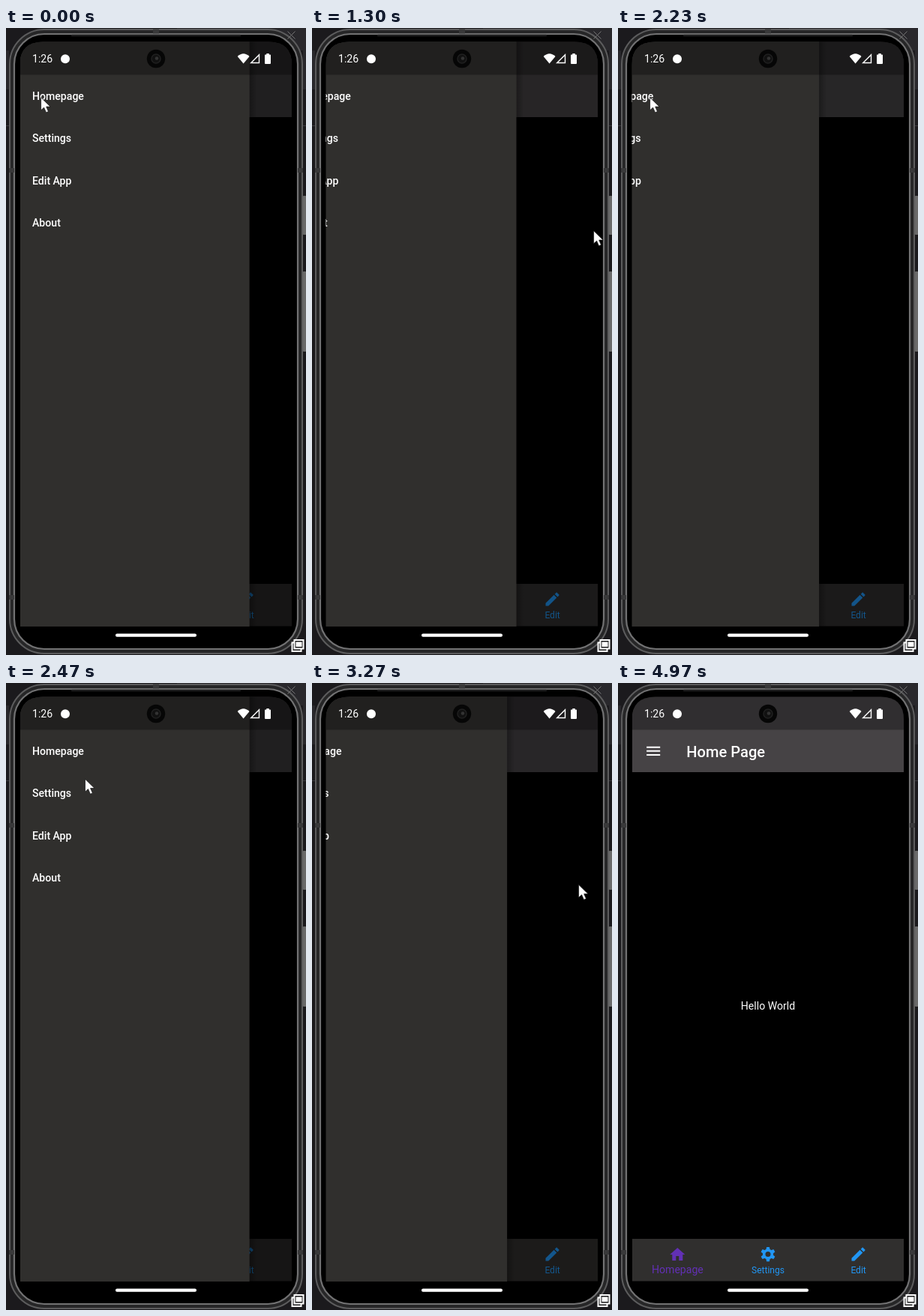
These frames come from a looping animation (400 by 837 pixels, 5 s). An HTML page:

```html
<!DOCTYPE html>
<html lang="en">
<head>
<meta charset="utf-8">
<title>Drawer navigation</title>
<style>
  html, body { margin: 0; width: 100%; height: 100%; overflow: hidden; background: #1b1a1d; }
  svg { display: block; width: 400px; height: 837px; }
  text { font: 400 14.08px Roboto, sans-serif; fill: #fff; }
  .drawer-item { font-weight: 500; }
  .title { font-size: 20.1px; font-weight: 500; }
  .small { font-size: 12.07px; }
  .mid { text-anchor: middle; }
  .blue { fill: #2196f3; }
  .purple { fill: #6230b5; }
</style>
</head>
<body>
<svg viewBox="0 0 400 837" xmlns="http://www.w3.org/2000/svg">
  <defs>
    <clipPath id="screen"><path d="M18.500 800V49Q18.500 18.500 50 18.500H350Q381 18.500 381 49V800Z"/></clipPath>
    <linearGradient id="edge">
      <stop offset="0" stop-color="#000" stop-opacity=".3"/>
      <stop offset="1" stop-color="#000" stop-opacity="0"/>
    </linearGradient>
  </defs>

  <!-- desktop behind the phone -->
  <rect width="400" height="837" fill="#1b1a1d"/>
  <path d="M228 0H400V30H228ZM0 30H4V82H0ZM396 30H400V82H396Z" fill="#29282c"/>
  <path d="M0 130.5H4M396 130.5H400" stroke="#3a393d"/>

  <!-- phone body -->
  <g fill="#6a6a6a">
    <rect x="395" y="224" width="6" height="52" rx="2"/>
    <rect x="395" y="325" width="6" height="107" rx="2"/>
  </g>
  <rect x="5" y="2" width="390" height="833" rx="46" fill="#262627" stroke="#5c5c5d" stroke-width="2"/>
  <rect x="11" y="8" width="378" height="821" rx="40" fill="#000" stroke="#727273" stroke-width="2.2"/>
  <path d="M88 10H312" stroke="#1d1d1e" stroke-width="2.5" stroke-linecap="round"/>
  <path d="M196 4.5H204M4 190H11M4 760H11M389 190H396M389 760H396" stroke="#39393a" stroke-width="6"/>

  <!-- app -->
  <g clip-path="url(#screen)">
    <rect x="19" y="18" width="362" height="781" fill="#000"/>
    <rect x="19" y="18" width="362" height="101" fill="#464345"/>
    <path d="M38.100 85.700H56.200M38.100 90.800H56.200M38.100 95.900H56.200" stroke="#fff" stroke-width="2"/>
    <text class="title" x="91.3" y="98.8">Home Page</text>
    <text class="mid" x="200" y="435.8">Hello World</text>
    <rect x="19" y="742" width="362" height="56.5" fill="#302f2e"/>
    <path class="purple" transform="translate(67.3 750.9)" d="M10 20v-6h4v6h5v-8h3L12 3 2 12h3v8z"/>
    <g id="gear" class="blue" transform="translate(200 762.6)"></g>
    <path class="blue" transform="translate(308.500 750.6)" d="M3 17.25V21h3.75L17.81 9.94l-3.75-3.75L3 17.25zM20.71 7.04c.39-.39.39-1.02 0-1.41l-2.34-2.34c-.39-.39-1.02-.39-1.41 0l-1.83 1.83 3.75 3.75 1.83-1.83z"/>
    <text class="mid purple" x="79.4" y="787.7">Homepage</text>
    <text class="mid small blue" x="200" y="788">Settings</text>
    <text class="mid small blue" x="320.6" y="788">Edit</text>

    <rect id="scrim" x="19" y="18" width="362" height="781"/>
    <g id="drawer">
      <rect x="324.6" y="18" width="10" height="781" fill="url(#edge)"/>
      <rect x="19" y="18" width="305.6" height="781" fill="#302f2d"/>
      <g id="items"></g>
    </g>
    <rect x="19" y="18" width="362" height="44.5" opacity=".31"/>
  </g>

  <!-- status bar -->
  <text x="35" y="46.3">1:26</text>
  <circle cx="79" cy="41.3" r="6" fill="#fff"/>
  <circle cx="200" cy="41" r="12.2" fill="#060606"/>
  <circle cx="200" cy="41" r="6" fill="#111" stroke="#202020" stroke-width="1.5"/>
  <circle cx="201" cy="40.5" r="2.3" fill="#333"/>
  <g fill="#fff">
    <path d="M308.700 38Q316.600 30.500 324.500 38L316.600 47.500Z"/>
    <path d="M337.500 35.700V46.500H326.700Z" fill="none" stroke="#fff" stroke-width="1.4"/>
    <path d="M347.300 34H350.700V35.500H352.200Q353 35.500 353 36.300V47Q353 48 352 48H346Q345 48 345 47V36.300Q345 35.500 345.800 35.500H347.300Z"/>
    <rect x="146" y="808.500" width="108" height="4.300" rx="2.100"/>
  </g>

  <!-- window controls -->
  <path d="M375.500 4.500L385.500 14.500M385.500 4.500L375.500 14.500" stroke="#777" stroke-width="1"/>
  <g stroke="#fff" stroke-width="2">
    <rect x="381.500" y="820.500" width="12" height="11.500" fill="#171718"/>
    <rect x="384.500" y="817" width="12" height="11.500" fill="#171718"/>
    <path d="M386.500 819.500H394.500V826H386.500Z" fill="#fff" stroke="none"/>
  </g>

  <path id="cursor" d="M.6 .8V17.800L4.600 14.200L7.500 20.800L10.500 19.500L7.700 13.100H13.100Z" fill="#fff" stroke="#111" stroke-width=".7"/>
</svg>
<script>
  const LOOP = 5000, WIDTH = 305.6;
  const $ = id => document.getElementById(id);

  $("items").innerHTML = ["Homepage", "Settings", "Edit App", "About"]
    .map((s, i) => `<text class="drawer-item" x="35" y="${96.1 + 56.3 * i}">${s}</text>`)
    .join("");

  const tooth = a => `<path d="M-2.6 -6L-1.9 -9.7H1.9L2.6 -6Z" transform="rotate(${a})"/>`;
  $("gear").innerHTML =
    '<circle r="5.3" fill="none" stroke="#2196f3" stroke-width="3.6"/>' +
    [0, 60, 120, 180, 240, 300].map(tooth).join("");

  // Pointer path: time, x, y
  const path = [
    [0, 46, 92], [490, 46, 92], [500, 81, 106.5], [680, 81, 106.5],
    [1000, 375, 270], [1370, 375, 270], [1670, 78, 125], [1850, 42, 92],
    [2380, 42, 92], [2830, 353, 267], [2890, 353, 267], [3000, 355, 268.5],
    [3300, 355, 268.5], [3530, 210, 240], [3760, 70, -30]
  ];

  function pointer(t) {
    const i = path.findIndex(k => k[0] > t);
    if (i < 0) return null;
    const [t0, x0, y0] = path[i - 1], [t1, x1, y1] = path[i];
    const p = (t - t0) / (t1 - t0);
    return [x0 + (x1 - x0) * p, y0 + (y1 - y0) * p];
  }

  // Critically damped spring aimed slightly past its end, then stopped there
  function left(ms) {
    const s = ms / 1000, w = Math.sqrt(500), past = 0.01, reach = 1 + past;
    return Math.max(0, (reach + (w * reach - 1) * s) * Math.exp(-w * s) - past);
  }

  function openness(t) {
    if (t < 1270) return 1 - left(t + 400);
    if (t < 2097) return left(t - 1270);
    if (t < 3235) return 1 - left(t - 2097);
    return left(t - 3235);
  }

  function draw(t) {
    const open = openness(t), tip = pointer(t);
    $("drawer").setAttribute("transform", `translate(${(open - 1) * WIDTH} 0)`);
    $("drawer").setAttribute("visibility", open > 0 ? "visible" : "hidden");
    $("scrim").setAttribute("opacity", 0.54 * open);
    $("cursor").setAttribute("visibility", tip ? "visible" : "hidden");
    if (tip) $("cursor").setAttribute("transform", `translate(${tip[0]} ${tip[1]})`);
  }

  const start = performance.now();
  function tick() {
    draw((performance.now() - start) % LOOP);
    requestAnimationFrame(tick);
  }
  tick();
</script>
</body>
</html>
```
